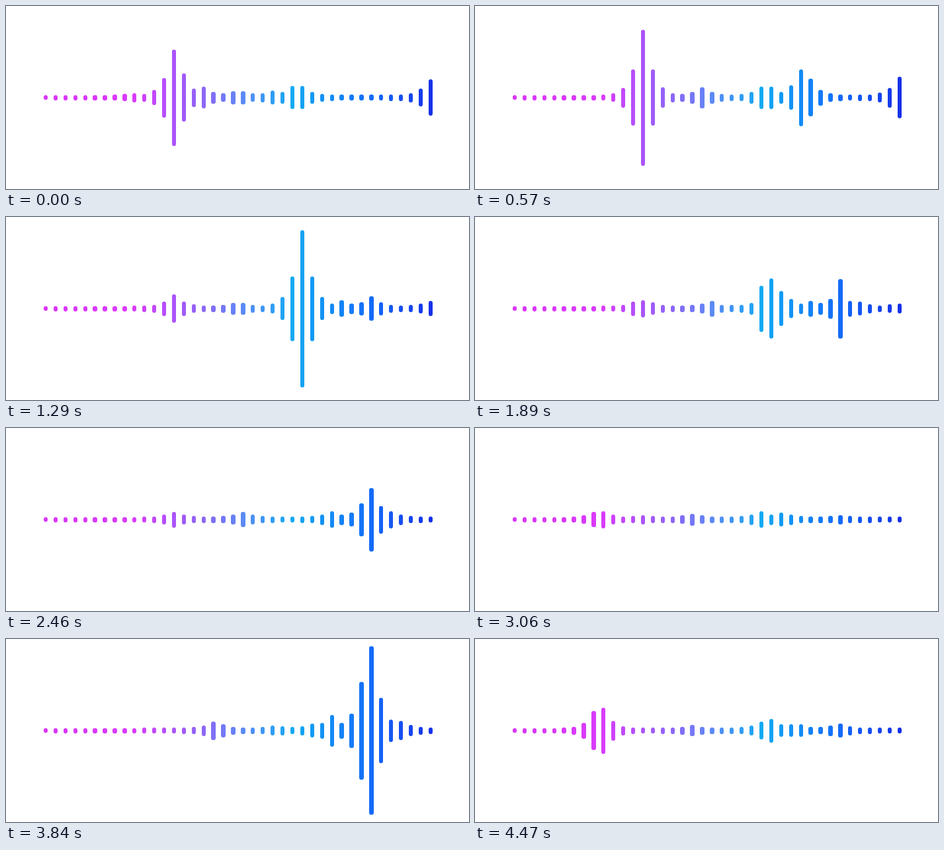
These frames come from a looping animation (700 px wide and 277 px high, 4.5 s). An HTML page with a canvas:

```html
<!DOCTYPE html>
<html lang="en">
<head>
<meta charset="utf-8">
<title>Sound wave</title>
<style>
  html, body { margin: 0; width: 100%; height: 100%; overflow: hidden; background: #fff; }
  canvas { display: block; width: 700px; height: 277px; }
</style>
</head>
<body>
<canvas id="wave" width="700" height="277"></canvas>
<script>
const ctx = document.getElementById('wave').getContext('2d');
const LOOP = 4500, STEP = 30, BARS = 40;
const LEFT = 60, GAP = 14.92, MID = 138.8, WIDTH = 6;
const TONES = [13, 26, 33];   // bars where the voice is loudest

// Loudest points of the sound: time, then [bar, height] peaks
const poses = [
  { time: 0, peaks: [[9, 6], [13.1, 148], [16, 24], [19.5, 16], [23, 12], [25.5, 40], [39, 46]] },
  { time: 570, peaks: [[13, 197], [19, 23], [25.5, 39], [29.25, 94], [39, 54]] },
  { time: 1290, peaks: [[13, 34], [19.5, 13], [26, 229], [30, 16], [33, 28], [39, 14]] },
  { time: 2460, peaks: [[13, 15], [20, 14], [29, 16], [32.9, 94], [35, 17]] },
  { time: 3060, peaks: [[8.6, 25], [13, 5], [18, 9], [25, 16], [27.2, 14], [33, 5]] },
  { time: 3840, peaks: [[17.2, 22], [23.4, 8], [27, 12], [29, 39], [32.8, 290], [36, 20]] },
  { time: 4470, peaks: [[8.6, 86], [18, 8], [25.7, 34], [28.5, 15], [32.8, 14]] }
];

function seeded(seed) {
  return () => (seed = seed * 16807 % 2147483647) / 2147483647;
}

const falloff = d => Math.exp(-0.8 * d - 0.15 * d * d);
const quiet = i => 7 + 2 * Math.min(1, i / 15);
const level = (peaks, i) =>
  Math.max(...peaks.map(([bar, h]) => h * falloff(Math.abs(i - bar))));

// Two short swells between each pair of poses
const random = seeded(2024);
const bursts = poses.slice(1).flatMap((next, n) => [1 / 3, 2 / 3].map(u => ({
  time: poses[n].time + (next.time - poses[n].time) * u,
  peak: [TONES[Math.floor(random() * TONES.length)], 120 + 140 * random()]
})));

function heightAt(i, t) {
  const n = poses.findLastIndex(p => p.time <= t);
  const a = poses[n], b = poses[n + 1] || a;
  const u = (t - a.time) / (b.time - a.time || 1);
  const from = level(a.peaks, i), to = level(b.peaks, i);
  const flutter = 1 + 0.4 * Math.sin(i * 2.4 + t / 45) * Math.sin(Math.PI * u);
  const swells = bursts.map(({ time, peak }) =>
    level([peak], i) * Math.exp(-(((t - time) / 80) ** 2)));
  return quiet(i) + Math.max((from + (to - from) * u) * flutter, ...swells);
}

const hue = ctx.createLinearGradient(LEFT, 0, LEFT + 39 * GAP, 0);
[[0, '#d935f8'], [9, '#d93bfb'], [13, '#ab54fb'], [16, '#8c67f6'], [20, '#5b8af5'],
 [25, '#13aaf3'], [33, '#146bf8'], [39, '#1631e9']]
  .forEach(([bar, color]) => hue.addColorStop(bar / 39, color));
ctx.fillStyle = hue;

// Snap a span to whole pixels, keeping edge pixels that are covered enough
const snap = (center, size) => {
  const from = Math.ceil(center - size / 2 - 0.65);
  return [from, Math.floor(center + size / 2 + 0.65) - from];
};

function draw(now) {
  const t = Math.floor((now % LOOP) / STEP) * STEP;
  ctx.clearRect(0, 0, 700, 277);
  ctx.beginPath();
  for (let i = 0; i < BARS; i++) {
    const [x, w] = snap(LEFT + i * GAP, WIDTH);
    const [y, h] = snap(MID, heightAt(i, t));
    ctx.roundRect(x, y, w, h, WIDTH / 2);
  }
  ctx.fill();
}

let start;
function tick(now) {
  start ??= now;
  draw(now - start);
  requestAnimationFrame(tick);
}
draw(0);
requestAnimationFrame(tick);
</script>
</body>
</html>
```
